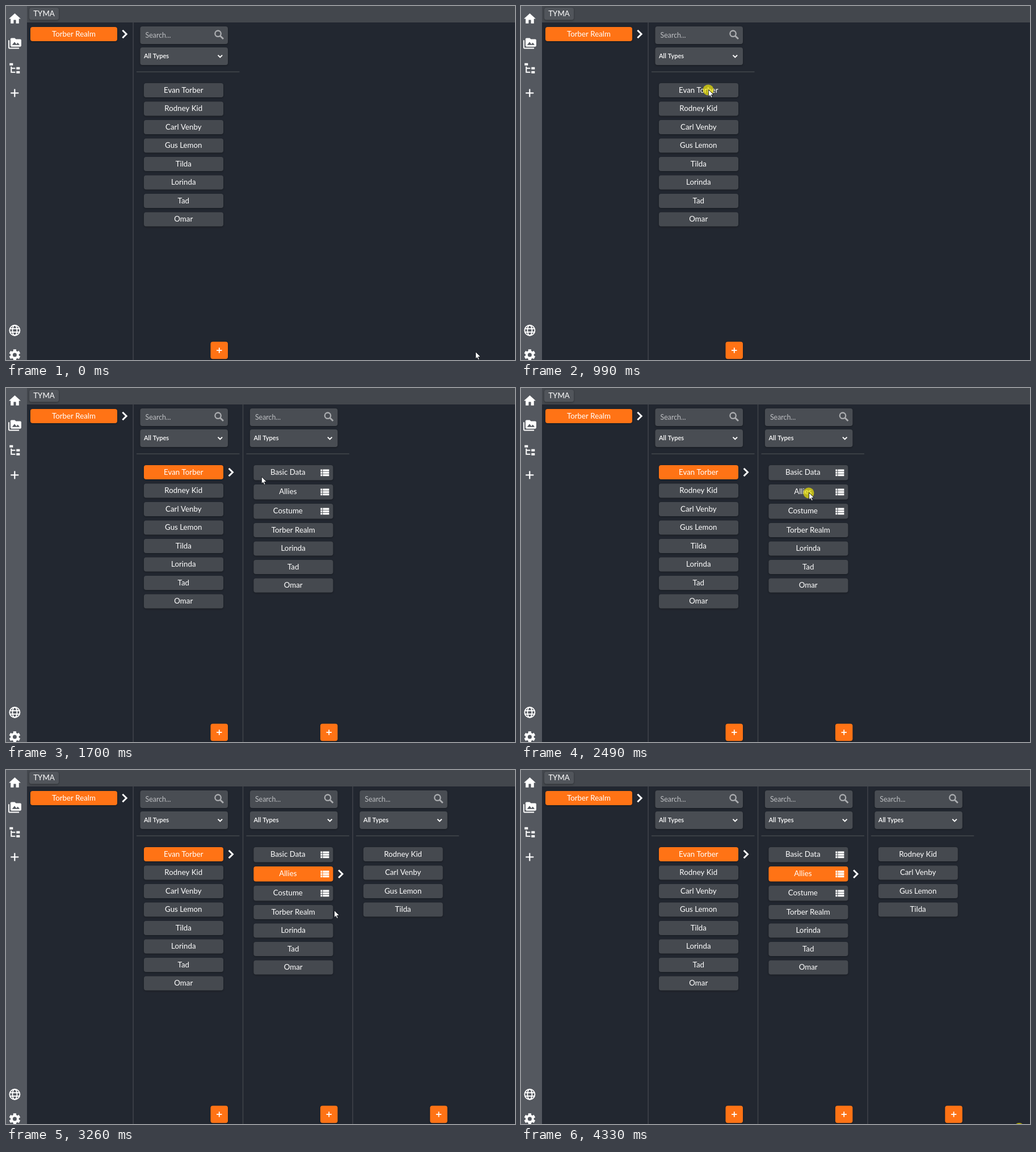
Animation of 897 by 624 pixels, one loop 4.41 s. Source, as an HTML page with a canvas:

```html
<!DOCTYPE html>
<html lang="en">
<head>
<meta charset="utf-8">
<title>World browser</title>
<style>
  html, body { margin: 0; width: 100%; height: 100%; overflow: hidden; background: #222730; }
  canvas { display: block; }
</style>
</head>
<body>
<canvas id="stage" width="897" height="624"></canvas>
<script>
const ctx = document.getElementById('stage').getContext('2d');
const LOOP = 4410;
const FONT = 'Lato, "Open Sans", sans-serif';
const COLOR = {
  back: '#222730', bar: '#43474d', side: '#54585f', rule: '#3d4148',
  field: '#494d53', button: '#45494f', tab: '#51555b', accent: '#ff7315',
  text: '#ffffff', hint: '#bdbfc2', lens: '#abadb0'
};
const COLUMN_GAP = 193.4;
const WORLD = 'Torber Realm';
const people = ['Evan Torber', 'Rodney Kid', 'Carl Venby', 'Gus Lemon', 'Tilda', 'Lorinda', 'Tad', 'Omar'];
const sheets = ['Basic Data', 'Allies', 'Costume'];
const details = [...sheets, WORLD, ...people.slice(5)];
const allies = people.slice(1, 5);

// 24-unit icon outlines
const icons = {
  home: new Path2D('M10 20v-6h4v6h5v-8h3L12 3 2 12h3v8z'),
  media: new Path2D('M2 6H0v14c0 1.1.9 2 2 2h18v-2H2V6zM22 4h-8l-2-2H6c-1.1 0-2 .9-2 2v12c0 1.1.9 2 2 2h16c1.1 0 2-.9 2-2V6c0-1.1-.9-2-2-2zM7 15l4.5-6 3.5 4.5 2.5-3L21 15H7z'),
  tree: new Path2D('M3 3H9V7H3ZM15 10H21V14H15ZM15 17H21V21H15ZM13 13H7V18H13V20H5V9H7V11H13Z')
};
const arrow = new Path2D('M.5 .5V13L3.2 10.4 5.2 14.6 7.2 13.7 5.3 9.6 9.4 9.4Z');

// Pointer moves: first step, last step, step count, end point, ease-out power
const START = [827, 609];
const moves = [
  [70, 460, 6, 330, 147, 1.6],
  [1480, 1930, 7, 493, 159, 1.57],
  [2010, 2090, 2, 508, 175, 1],
  [2240, 2320, 2, 507, 184, 1],
  [3100, 3100, 1, 481, 193, 1],
  [3180, 3260, 2, 578, 247, 1],
  [3330, 3560, 4, 766, 405, 1.2],
  [3640, 3950, 5, 868, 593, 1.2],
  [4030, 4030, 1, 878, 630.5, 1]
];
const clicks = [[990, 1080], [2490, 2560], [4330, LOOP]];

function pointerAt(t) {
  let [x, y] = START;
  for (const [from, to, steps, endX, endY, power] of moves) {
    if (t < from) break;
    const gap = (to - from) / (steps - 1) || 1;
    const done = Math.min(steps, Math.floor((t - from) / gap + 0.1) + 1);
    const k = 1 - Math.pow(1 - done / steps, power);
    x += (endX - x) * k;
    y += (endY - y) * k;
  }
  return [x, y];
}

function rect(x, y, w, h, color) {
  ctx.fillStyle = color;
  ctx.fillRect(x, y, w, h);
}

function panel(x, y, w, h, color) {
  ctx.save();
  ctx.shadowColor = 'rgba(0,0,0,.35)';
  ctx.shadowBlur = 3;
  ctx.shadowOffsetY = 1;
  ctx.fillStyle = color;
  ctx.beginPath();
  ctx.roundRect(x, y, w, h, 4);
  ctx.fill();
  ctx.restore();
}

function label(text, x, y, size = 13.3, align = 'center', color = COLOR.text, weight = 400) {
  ctx.font = `${weight} ${size}px ${FONT}`;
  ctx.textAlign = align;
  ctx.fillStyle = color;
  ctx.fillText(text, x, y);
}

function line(points, width, color = COLOR.text) {
  ctx.beginPath();
  points.forEach(([x, y]) => ctx.lineTo(x, y));
  ctx.lineWidth = width;
  ctx.strokeStyle = color;
  ctx.stroke();
}

function plus(x, y, r, width) {
  line([[x - r, y], [x + r, y]], width);
  line([[x, y - r], [x, y + r]], width);
}

function chevron(x, y) {
  line([[x - 3.6, y - 6.8], [x + 3.2, y], [x - 3.6, y + 6.8]], 3);
}

function icon(name, x, y, scale) {
  ctx.save();
  ctx.translate(x, y);
  ctx.scale(scale, scale);
  ctx.translate(-12, -12);
  ctx.fillStyle = COLOR.text;
  ctx.fill(icons[name], 'evenodd');
  ctx.restore();
}

function globe(x, y) {
  ctx.strokeStyle = COLOR.text;
  ctx.lineWidth = 1.9;
  for (const rx of [9, 4]) {
    ctx.beginPath();
    ctx.ellipse(x, y, rx, 9, 0, 0, Math.PI * 2);
    ctx.stroke();
  }
  for (const dy of [-3, 3]) line([[x - 8.4, y + dy], [x + 8.4, y + dy]], 1.9);
}

function disc(x, y, r, color) {
  ctx.fillStyle = color;
  ctx.beginPath();
  ctx.arc(x, y, r, 0, Math.PI * 2);
  ctx.fill();
}

function gear(x, y) {
  disc(x, y, 7.4, COLOR.text);
  for (let i = 0; i < 6; i++) {
    ctx.save();
    ctx.translate(x, y);
    ctx.rotate(i * Math.PI / 3);
    rect(-2.6, -9.8, 5.2, 5, COLOR.text);
    ctx.restore();
  }
  disc(x, y, 3.5, COLOR.side);
}

function listIcon(x, y) {
  for (let i = 0; i < 3; i++) {
    rect(x, y + i * 4.2, 3, 3.4, COLOR.text);
    rect(x + 4, y + i * 4.2, 11, 3.4, COLOR.text);
  }
}

function frame() {
  rect(0, 0, 897, 624, COLOR.back);
  rect(37, 0, 860, 29, COLOR.bar);
  rect(0, 0, 37, 624, COLOR.side);
  panel(41, 3, 52, 21.5, COLOR.tab);
  label('TYMA', 67, 18.3);

  icon('home', 15.5, 22.4, 1.04);
  icon('media', 15.5, 66, 0.95);
  icon('tree', 15.3, 109.7, 1);
  plus(15.3, 153.4, 7, 2.2);
  globe(15.4, 571.8);
  gear(15.4, 615);

  panel(43, 37, 153, 25, COLOR.accent);
  label(WORLD, 119.4, 53.6);
  chevron(209, 49.5);
}

function column(index, items, active) {
  ctx.save();
  ctx.translate(index * COLUMN_GAP, 0);
  rect(223.3, 29, 1.7, 595, COLOR.rule);

  panel(236.5, 36, 154.5, 31, COLOR.field);
  label('Search...', 245.5, 56, 12.4, 'left', COLOR.hint);
  ctx.strokeStyle = COLOR.lens;
  ctx.lineWidth = 2.3;
  ctx.beginPath();
  ctx.arc(373.6, 48.7, 5.2, 0, Math.PI * 2);
  ctx.stroke();
  line([[377.3, 52.4], [383, 58.1]], 2.8, COLOR.lens);

  panel(236.5, 73, 154.5, 31, COLOR.field);
  label('All Types', 243, 92.2, 11.1, 'left', COLOR.text, 600);
  line([[373.5, 86.6], [377.3, 90.4], [381.1, 86.6]], 2);
  rect(230, 115.3, 181.5, 1.5, COLOR.bar);

  let y = 136;
  items.forEach((name, i) => {
    const sheet = sheets.includes(name);
    const h = sheet ? 26.5 : 25;
    const mid = y + h / 2;
    panel(243, y, 140, h, i === active ? COLOR.accent : COLOR.button);
    label(name, sheet ? 303.4 : 312.8, mid + 4.1);
    if (sheet) listIcon(361, mid - 5.8);
    if (i === active) chevron(396.3, mid);
    y += sheet ? 34 : 32.5;
  });

  panel(360.5, 591.7, 30.5, 30.5, COLOR.accent);
  plus(375.8, 607, 4.7, 1.8);
  ctx.restore();
}

function pointer(t) {
  const [x, y] = pointerAt(t);
  if (clicks.some(([from, to]) => t >= from && t < to)) {
    disc(x, y + 1, 9.5, 'rgba(250,240,0,.65)');
  }
  ctx.save();
  ctx.translate(x, y);
  ctx.fillStyle = '#fff';
  ctx.fill(arrow);
  ctx.lineWidth = 0.9;
  ctx.strokeStyle = '#15181d';
  ctx.stroke(arrow);
  ctx.restore();
}

function draw(t) {
  const opened = t >= 1080;
  const expanded = t >= 2560;
  frame();
  column(0, people, opened ? 0 : -1);
  if (opened) column(1, details, expanded ? 1 : -1);
  if (expanded) column(2, allies, -1);
  pointer(t);
}

const began = performance.now();
function tick() {
  draw((performance.now() - began) % LOOP);
  requestAnimationFrame(tick);
}
tick();
</script>
</body>
</html>
```
